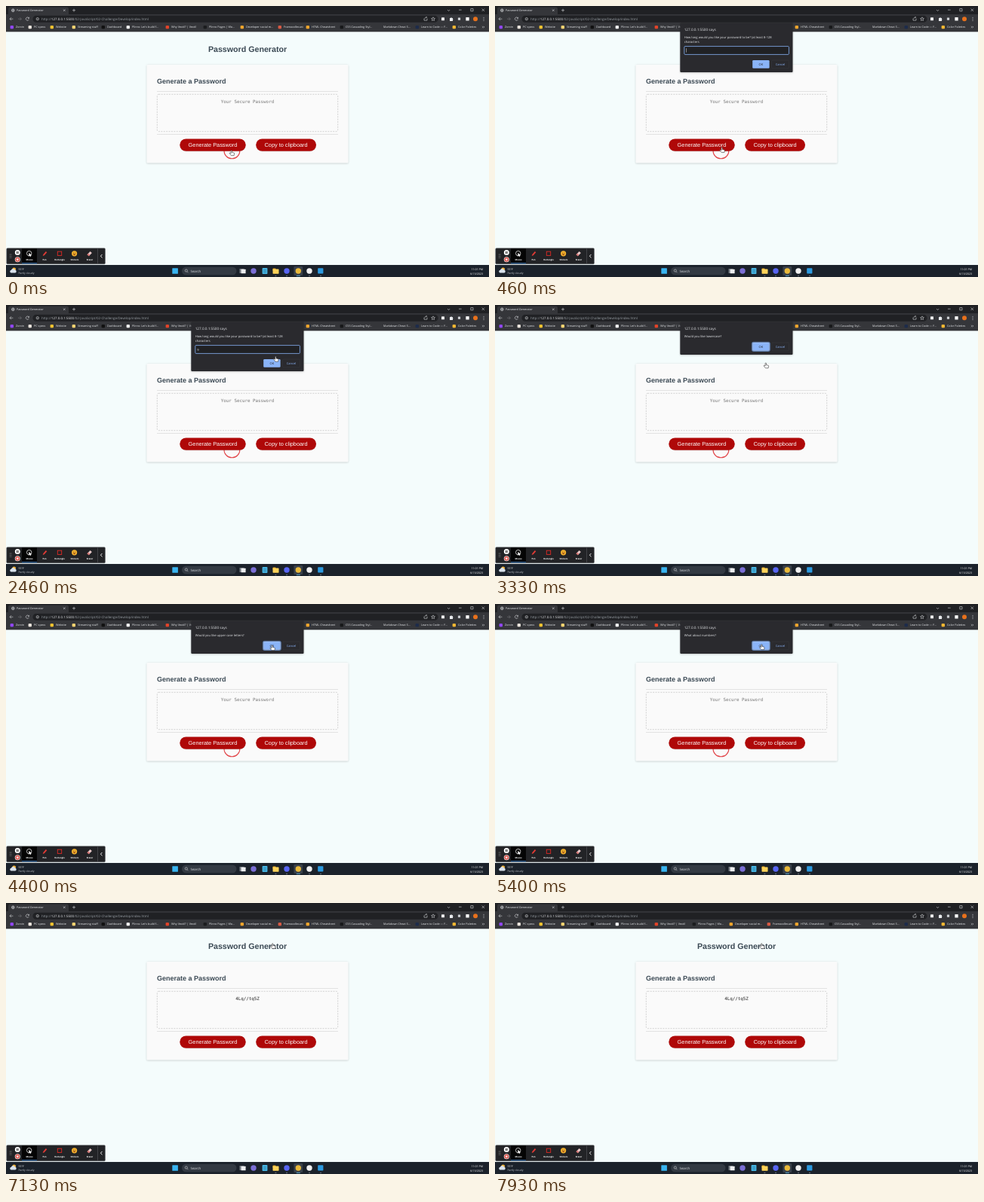
An HTML page that plays this animation: 640 by 360 pixels, repeating every 8 s.

```html
<!DOCTYPE html>
<html lang="en">
<head>
<meta charset="utf-8">
<title>Password Generator</title>
<style>
html, body { margin: 0; width: 100%; height: 100%; overflow: hidden; background: #f4fcfc; }
svg { display: block; width: 100vw; height: 100vh; }
text { font-family: "Open Sans", "Noto Sans", sans-serif; text-rendering: geometricPrecision; white-space: pre; }
.page { font-family: "Liberation Sans", Arial, sans-serif; }
.mono { font-family: "DejaVu Sans Mono", monospace; }
.b { font-weight: 700; }
.line { fill: none; stroke: #d5d7da; stroke-width: .6; }
</style>
</head>
<body>
<svg id="stage" viewBox="0 0 640 360" xmlns="http://www.w3.org/2000/svg"></svg>
<script>
const LOOP = 8000;
const BLUE = '#8ab4f8', BAR = '#35363a', DARK = '#202124', PALE = '#e8eaed', RED = '#af0808';

const rect = (x, y, w, h, fill, r = 0, more = '') =>
  `<rect x="${x}" y="${y}" width="${w}" height="${h}" rx="${r}" fill="${fill}" ${more}/>`;
const dot = (x, y, r, fill, more = '') => `<circle cx="${x}" cy="${y}" r="${r}" fill="${fill}" ${more}/>`;
const path = (d, more = 'class="line"') => `<path d="${d}" ${more}/>`;
const text = (x, y, size, fill, str, more = '') =>
  `<text x="${x}" y="${y}" font-size="${size}" fill="${fill}" ${more}>${str}</text>`;
const group = (id, body) => `<g id="${id}">${body}</g>`;
const MID = 'text-anchor="middle"', END = 'text-anchor="end"';

function page() {
  const button = (x, w, label) =>
    rect(x, 176.8, w, 16.6, '#000', 8.3, 'opacity=".12"') +
    rect(x, 176.4, w, 16.4, RED, 8.2) +
    text(x + w / 2, 187.2, 7.33, '#fff', label, `${MID} class="page"`);
  return rect(0, 34, 640, 310, '#f4fcfc') +
    text(320, 61, 10.67, '#3b4954', 'Password Generator', `${MID} class="page b"`) +
    rect(186.67, 78, 266.67, 130.3, '#fafafa', .8, 'filter="url(#shade)"') +
    text(200, 102.8, 9, '#3b4954', 'Generate a Password', 'class="page b"') +
    rect(200, 113, 240, .7, '#d8d8d8') +
    rect(200.3, 117.3, 239.4, 49.4, '#fafafa', 2, 'stroke="#bfbfbf" stroke-width=".67" stroke-dasharray="2 1.4"') +
    text(320, 128.8, 5.85, '#757575', 'Your Secure Password', `${MID} class="mono" id="hint"`) +
    text(320, 128.8, 5.85, '#222', '4Lq//tq5Z', `${MID} class="mono" id="result"`) +
    rect(200, 170.3, 240, .7, '#d8d8d8') +
    dot(299.4, 192.4, 10.4, 'none', 'id="ring" stroke="#e2474b" stroke-width="1.1"') +
    button(230.3, 87.4, 'Generate Password') + button(331.2, 79.8, 'Copy to clipboard');
}

function browser() {
  const marks = [
    [13, 'Zorvin', '#9146ff'], [37, 'PC specs', '#e9e3dc'], [66, 'Website', '#f2c230'],
    [95, 'Streaming stuff', '#f5d271'], [134, 'Dashboard', '#111'], [167, "Plinro: Let's build f...", '#f1f1f1'],
    [219, 'Why Vextil? | Vextil', '#e24329'], [269, 'Plinro Pages | Wo...', '#1b1c1e'],
    [318, 'Developer social m...', '#f0a52c'], [368, 'Framoodlecast', '#d85a44'],
    [405, 'HTML Cheatsheet', '#f0a52c'], [450, 'CSS Cascading Styl...', '#17181a'],
    [500, 'Markdown Cheat S...', ''], [550, 'Learn to Code — F...', '#1d2b4a'], [599, 'Color Palettes', '#f2b632']
  ];
  const ext = [[579, '#f4f4f4', 2], [600.5, '#cfd2d6', 1.6], [611.5, '#f4f4f4', 2.2]];
  return rect(0, 0, 640, 12, DARK) + rect(0, 11, 640, 23.3, BAR) +
    rect(3, 1.5, 80, 12, BAR, 2.5) +
    dot(9.3, 5.8, 1.9, 'none', 'class="line"') + path('M7.4 5.8H11.2M9.3 3.9V7.7') +
    text(14, 7.2, 3.75, PALE, 'Password Generator') +
    path('M76 4.4l2.6 2.6m0-2.6l-2.6 2.6M88 5.7h4m-2-2v4') +
    path('M585 5l1.6 1.6L588.2 5M600 5.2h3.6M615.8 3.6h3.2v3.2h-3.2zM630.6 3.6l3.4 3.4m0-3.4l-3.4 3.4') +
    path('M9.4 17.2H5m2-2l-2 2 2 2') +
    path('M16 17.2h4.4m-2-2l2 2-2 2', 'class="line" style="stroke:#77797d"') +
    path('M30.3 16.1a2.1 2.1 0 1 0 .1 1.8M30.5 14.8v1.6h-1.6') +
    rect(35.5, 12.8, 537, 9, DARK, 4.5) +
    dot(41.8, 17.2, 1.7, 'none', 'class="line"') + path('M41.8 17v1.1M41.8 16v.3') +
    text(47, 18.8, 4.45, '#9aa0a6',
      'http://<tspan fill="#e8eaed">127.0.0.1:5500</tspan>/02-JavaScript/02-Challenge/Develop/index.html') +
    path('M554 16.5v2.6h4v-2.6M555 16.8c0-1.6 1.2-1.8 2.6-1.8m-1-1l1 1-1 1') +
    path('M566 14.8l.7 1.5 1.7.2-1.2 1.2.3 1.7-1.5-.8-1.5.8.3-1.7-1.2-1.2 1.7-.2z') +
    ext.map(([x, c, r]) => rect(x - r, 17.2 - r, r * 2, r * 2, c, .5)).join('') +
    path('M588 16h1.2a.8.8 0 0 1 1.6 0H592v1.2a.8.8 0 0 1 0 1.4V20h-4z', 'fill="#e8eaed"') +
    dot(622, 17.2, 3, '#e8711c') +
    [15.2, 17.2, 19.2].map(y => dot(633, y, .5, PALE)).join('') +
    marks.map(([x, label, c]) => (c ? rect(x - 7.4, 25.9, 4.4, 4.4, c, 1.1) : '') +
      text(x, 29.4, 3.75, PALE, label)).join('') +
    path('M631 26.8l1.2 1.2-1.2 1.2m1.6-2.4l1.2 1.2-1.2 1.2');
}

function tools() {
  const label = (x, str) => text(x, 337.6, 2.75, '#fff', str, `${MID} class="b"`);
  return rect(.8, 321.8, 130.6, 21, '#222326', 1.2, 'stroke="#55575a" stroke-width=".5"') +
    [330, 332.3, 334.6].map(y => dot(5.2, y, .45, '#ddd') + dot(7, y, .45, '#ddd')).join('') +
    dot(15.3, 327.6, 3.5, '#fff') + rect(14, 326, .9, 3.2, '#222') + rect(15.7, 326, .9, 3.2, '#222') +
    dot(15.3, 336.7, 3.5, '#fff') + dot(15.3, 336.7, 2.9, '#d84a42') + rect(14.1, 335.5, 2.4, 2.4, '#fff') +
    rect(21, 322.4, 20, 19.8, '#050505') + rect(21, 341.3, 20, .9, '#3b82d0') +
    dot(30.7, 328.6, 3.2, 'none', 'stroke="#eee" stroke-width=".8"') +
    path('M30.4 327.8v5l1.2-1 .9 1.5.7-.4-.8-1.5h1.6z', 'fill="#fff"') +
    path('M48.7 332l.7-2 3.4-4 1.5 1.2-3.5 4z', 'fill="#e23b35"') +
    rect(68.3, 326.2, 5.4, 5.2, 'none', 0, 'stroke="#e02a25" stroke-width=".9"') +
    dot(90.6, 328.8, 3.6, '#f5b32e') + dot(89.3, 328, .5, '#5a3510') + dot(91.9, 328, .5, '#5a3510') +
    path('M88.8 329.6a1.9 1.9 0 0 0 3.6 0z', 'fill="#8a3a16"') +
    path('M107.5 330.2l4-4.2 2.4 2-4 4.2z', 'fill="#e9c9c9"') +
    path('M107.5 330.2l1.3-1.4 2.4 2-1.3 1.4z', 'fill="#d7716f"') +
    label(31, 'Mouse') + label(51, 'Pen') + label(71, 'Rectangle') + label(91, 'Stickers') + label(111, 'Eraser') +
    rect(121.2, 322.4, .5, 19.8, '#606266') +
    path('M127.4 330l-2 2.2 2 2.2', 'fill="none" stroke="#fff" stroke-width=".9"');
}

function taskbar() {
  const icons = [[328, '#7b6fd6'], [372, '#5865f2'], [387.3, '#e9b93a'], [402, '#f2f2f2']];
  return rect(0, 344, 640, 16, '#1b222b') +
    dot(10.7, 349.8, 2.4, '#f6b73c') +
    path('M6.6 354.5a1.9 1.9 0 0 1 .3-3.7 2.7 2.7 0 0 1 5-.2 2 2 0 0 1 .4 3.9z', 'fill="#d9e2ec"') +
    text(16.5, 350.6, 3.5, '#fff', '55°F') + text(16.5, 356.4, 3.5, '#c4c8cd', 'Partly cloudy') +
    rect(220.3, 348.2, 7.6, 7.6, '#39b4f0', .6) +
    rect(233, 346.8, 72.5, 10.4, '#333a43', 5.2) +
    dot(238.8, 351.5, 1.6, 'none', 'class="line"') + path('M240 352.7l1.4 1.4') +
    text(244.5, 353.7, 4.4, '#e0e3e6', 'Search') +
    rect(309.5, 349, 6, 6, '#777c83', .5) + rect(311.6, 349.8, 6, 5.4, '#eceef0', .5) +
    rect(381.4, 346, 11.8, 12, '#39414b', 1.2) +
    icons.map(([x, c]) => dot(x, 352, 3.7, c)).join('') +
    rect(339.6, 348, 6.8, 8, '#49b7e4', .8) + path('M341 350.5h4m-4 1.7h4m-4 1.7h4', 'stroke="#19628d" stroke-width=".5"') +
    rect(353.5, 348.4, 4, 3, '#e0a425', .5) + rect(353.5, 349.5, 8, 6.2, '#ffd35a', .6) +
    rect(413.2, 348.3, 7.2, 7.2, '#2c9ae0', .8) +
    [357.4, 372, 402, 417].map(x => rect(x - 1, 358, 2, .7, '#8d949c', .3)).join('') +
    rect(384.6, 358, 5.4, .8, '#61c3f4', .4) +
    text(632, 350.8, 3.6, '#fff', '11:01 PM', END) + text(632, 356.8, 3.6, '#fff', '6/13/2023', END);
}

function dialog(h, lines, extra, focus) {
  const y = 23 + h - 16;
  return rect(245.3, 22.6, 149.2, h + .4, '#292a2d', 1.2, 'filter="url(#shade)"') +
    text(250.7, 33, 4.65, PALE, '127.0.0.1:5500 says') +
    lines.map((s, i) => text(250.7, 42.6 + i * 6.6, 4.1, PALE, s)).join('') + extra +
    (focus ? rect(340.4, y - .7, 24, 12.2, 'none', 1.8, 'stroke="#5b86c4" stroke-width=".8"') : '') +
    rect(341.2, y, 22.4, 10.8, BLUE, 1.3, focus ? 'stroke="#d3e3fd" stroke-width=".4"' : '') +
    text(352.4, y + 6.9, 4, DARK, 'OK', MID) +
    rect(366.7, y, 22.8, 10.8, 'none', 1.3, 'stroke="#3d4045" stroke-width=".4"') +
    text(378, y + 6.9, 4, BLUE, 'Cancel', MID);
}

const field = rect(250.8, 53.6, 138.6, 10.8, DARK, 1, `stroke="${BLUE}" stroke-width=".8"`) +
  text(253.3, 60.5, 4.1, PALE, '9', 'id="typed"') + rect(253.4, 56.2, .5, 5.4, PALE, 0, 'id="caret"');

const asks = {
  length: dialog(65, ['How long would you like your password to be? (at least 8-128', 'characters'], field, false),
  lower: dialog(43, ['Would you like lowercase?'], '', true),
  upper: dialog(43, ['Would you like upper case letters?'], '', true),
  digits: dialog(43, ['What about numbers?'], '', true),
  special: dialog(43, ['Any special characters'], '', true)
};

const hand = path('M-.7.6c0-1 1.4-1 1.4 0v2.1l2.4.5c.6.2.8.5.7 1.1L3.3 6.8H-.3L-2.5 4.2c-.5-.8.4-1.4 1-.8l.8.7z',
  'fill="#fff" stroke="#222" stroke-width=".55"');
const beam = path('M-1.2-2.7H1.2M0-2.7V2.7M-1.2 2.7H1.2', 'stroke="#f4f4f4" stroke-width=".7"');

document.getElementById('stage').innerHTML =
  `<defs><filter id="shade" x="-10%" y="-10%" width="120%" height="130%">
    <feDropShadow dx="0" dy=".7" stdDeviation="1.1" flood-opacity=".25"/></filter></defs>` +
  page() + browser() + tools() + taskbar() +
  Object.entries(asks).map(([id, body]) => group(id, body)).join('') +
  group('cursor', group('hand', hand) + group('beam', beam));

const $ = id => document.getElementById(id);
const show = (id, on) => $(id).setAttribute('visibility', on ? 'inherit' : 'hidden');

// dialog name and the moment it opens
const scenes = [[0, ''], [260, 'length'], [3000, 'lower'], [4060, 'upper'], [4930, 'digits'], [5860, 'special'], [6860, 'done']];
// time, x, y of the pointer tip
const moves = [
  [0, 298.8, 191.8], [400, 298.8, 191.8], [930, 346, 82], [1230, 361, 59], [2200, 361, 59],
  [2700, 354, 76.5], [3000, 354, 76.5], [3200, 358.8, 77], [3400, 358.8, 77], [3800, 352.6, 54.8],
  [4500, 352.6, 54.8], [5000, 353.2, 53.8], [8000, 353.2, 53.8]
];
const TYPED = 1800;

function tip(t) {
  const i = Math.max(1, moves.findIndex(m => m[0] > t));
  const [t0, x0, y0] = moves[i - 1], [t1, x1, y1] = moves[i];
  const k = (t - t0) / (t1 - t0), e = k * k * (3 - 2 * k);
  return [x0 + (x1 - x0) * e, y0 + (y1 - y0) * e];
}

function draw(t) {
  const now = scenes.filter(s => s[0] <= t).pop()[1];
  for (const id in asks) show(id, id === now);
  const done = now === 'done';
  show('hint', !done);
  show('result', done);
  show('ring', !done);
  const inField = now === 'length';
  const typed = t >= TYPED;
  show('typed', inField && typed);
  show('caret', inField && (t < 1460 || (t - TYPED + 1000) % 1000 < 500));
  $('caret').setAttribute('x', typed ? 255.9 : 253.4);
  const [x, y] = tip(t);
  $('cursor').setAttribute('transform', `translate(${x.toFixed(2)} ${y.toFixed(2)})`);
  const text = inField && y > 53 && y < 65;
  show('beam', text);
  show('hand', !text);
}

const start = performance.now();
function frame() {
  draw((performance.now() - start) % LOOP);
  requestAnimationFrame(frame);
}
frame();
</script>
</body>
</html>
```
